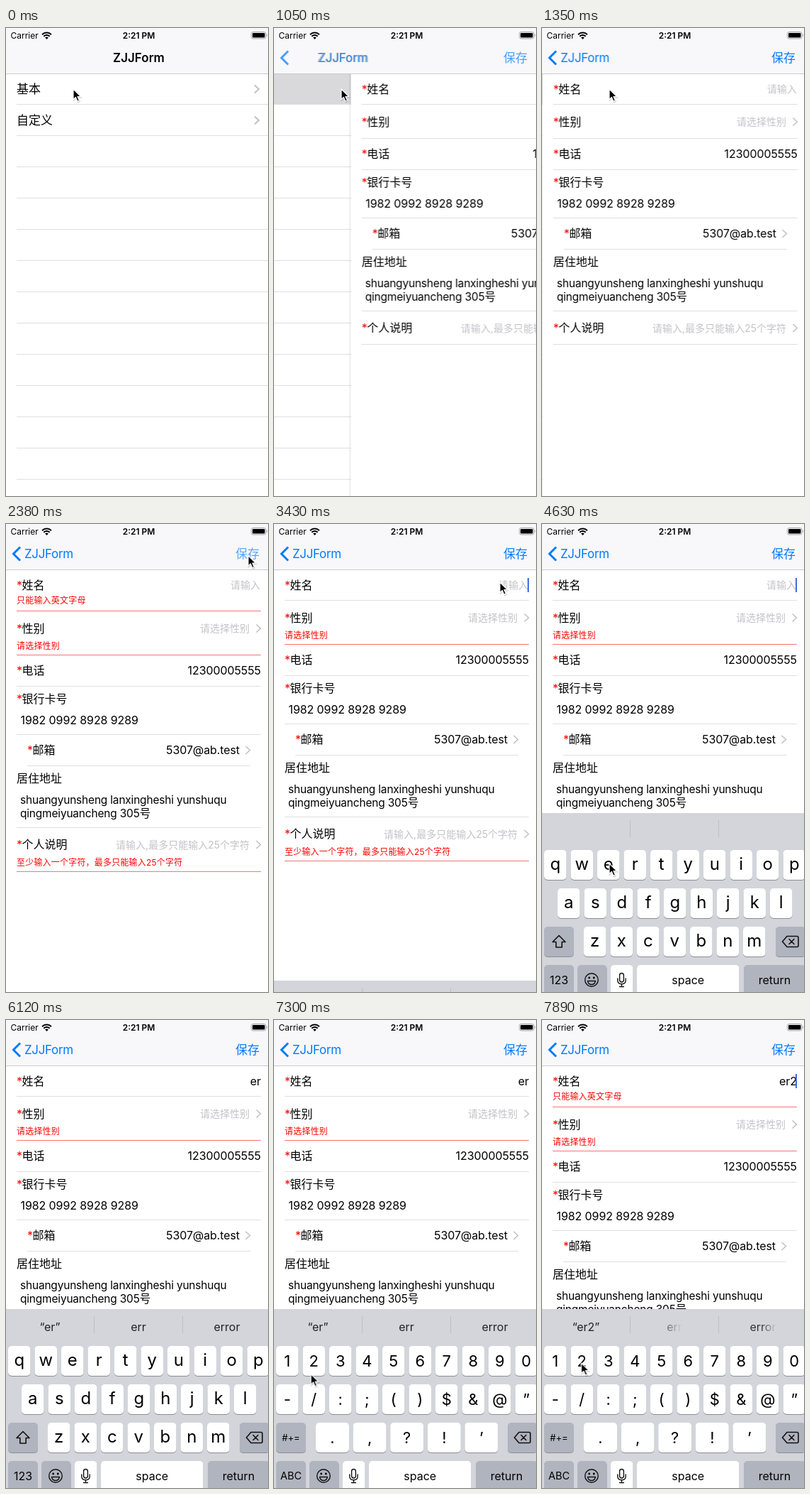
Animation, 370 px wide and 659 px high, one loop 8 s. Source, as an HTML page:

```html
<!DOCTYPE html>
<html lang="zh">
<head>
<meta charset="utf-8">
<title>ZJJForm</title>
<style>
  html, body { margin: 0; width: 100%; height: 100%; overflow: hidden; background: #fff; }
  svg { display: block; width: 370px; height: 659px; }
  text { font-family: Inter, "Noto Sans CJK SC", "Noto Sans CJK", sans-serif; white-space: pre; }
  [data-a] { animation: 8s linear infinite; }
  .step { animation-timing-function: step-end; }
  .red { fill: #f00; }
  .hint { fill: #c3c3c8; }
  .blue { fill: #007aff; }
  .err { fill: #f00; letter-spacing: .2px; }
  .value { letter-spacing: -.1px; }
  .prose { letter-spacing: -.2px; }
  .icon { fill: none; stroke: #111; stroke-width: 1.6; stroke-linecap: round; stroke-linejoin: round; }
</style>
</head>
<body>
<svg id="stage" viewBox="0 0 370 659"></svg>
<script>
const LOOP = 8000;
const SPRING = 'cubic-bezier(.36,.75,.1,1)';
const MID = 187.5;
const ALERT = '#fb7474';

// ---- drawing helpers: text is placed by its vertical centre ----
const text = (x, y, s, size = 16, attrs = '') =>
  `<text x="${x}" y="${y + size * .36}" font-size="${size}" ${attrs}>${s}</text>`;
const END = 'text-anchor="end"', CENTER = 'text-anchor="middle"';
const rect = (x, y, w, h, fill, attrs = '') =>
  `<rect x="${x}" y="${y}" width="${w}" height="${h}" fill="${fill}" ${attrs}/>`;
const line = (y, x = 15, end = 360, fill = '#dfdfe2') => rect(x, y, end - x, 1, fill);
const path = (d, attrs) => `<path d="${d}" ${attrs}/>`;
const chevron = (x, y, w = 1.5) =>
  path(`M${x} ${y - 5.5}l6 5.5-6 5.5`, `fill="none" stroke="#c1c1c5" stroke-width="${w}"`);
const anim = (name, body, step) => `<g data-a="${name}" class="${step ? 'step' : ''}">${body}</g>`;
const toggled = (name, body) => anim(name, body, true);
const label = (y, s, x = 15) => text(x, y, '*', 16, 'class="red"') + text(x + 7.5, y, s);
const error = (y, s, lineY) => text(15, y, s, 12, 'class="err"') + line(lineY, 15, 360, ALERT);

// ---- timing helpers, all times in ms ----
let css = '';
function keyframes(name, stops) {
  const body = stops.map(([ms, rule]) => `${ms / LOOP * 100}%{${rule}}`).join('');
  css += `@keyframes ${name}{${body}}[data-a="${name}"]{animation-name:${name}}`;
}
function toggle(name, first, ...flips) {
  const stops = [0, ...flips].map((ms, i) => [ms, `opacity:${(first + i) % 2}`]);
  keyframes(name, [...stops, [LOOP, stops.at(-1)[1]]]);
}
const at = (x, y = 0) => `transform:translate(${x}px,${y}px);`;
const ease = f => `animation-timing-function:${f};`;
function glide(name, start, from, to) {
  keyframes(name, [[0, from], [start, from + ease(SPRING)], [start + 500, to], [LOOP, to]]);
}

const PUSH = 920, SAVE = 2230, FOCUS = 3430, TYPE_E = 4930, TYPE_R = 5670, DIGITS = 6850, TYPE_2 = 7740;

glide('pageIn', PUSH, at(375), at(0));
glide('pageOut', PUSH, at(0), at(-112));
glide('titleOut', PUSH, at(0) + 'opacity:1;', at(-127) + 'opacity:0;');
glide('backIn', PUSH, at(127) + 'opacity:0;', at(0) + 'opacity:1;');
glide('fadeIn', PUSH, 'opacity:0;', 'opacity:1;');
glide('keyboard', FOCUS - 20, at(0, 260), at(0));
keyframes('saveTap', [[0, 'opacity:1'], [2070, 'opacity:1'], [2080, 'opacity:.3'],
  [SAVE, 'opacity:.3'], [2530, 'opacity:1'], [LOOP, 'opacity:1']]);

toggle('highlight', 0, 900);
toggle('nameOk', 1, SAVE, FOCUS, TYPE_2);
toggle('nameBad', 0, SAVE, FOCUS, TYPE_2);
toggle('restOk', 1, SAVE);
toggle('restBad', 0, SAVE);
keyframes('nameShift', [[0, at(0)], [SAVE, at(0, 15)], [FOCUS, at(0)], [TYPE_2, at(0, 15)], [LOOP, at(0, 15)]]);
keyframes('restShift', [[0, at(0)], [SAVE, at(0, 14)], [LOOP, at(0, 14)]]);

toggle('typed0', 1, TYPE_E);
toggle('typed1', 0, TYPE_E, TYPE_R);
toggle('typed2', 0, TYPE_R, TYPE_2);
toggle('typed3', 0, TYPE_2);
toggle('caret', 0, FOCUS, 4030, 4480, 6070, 6560, 7060, 7550);
toggle('letters', 1, DIGITS);
toggle('digits', 0, DIGITS);
toggle('popE', 0, 4780, TYPE_E);
toggle('popR', 0, 5520, TYPE_R);
toggle('pop2', 0, 7590, TYPE_2);

keyframes('pointer', [
  [0, 95, 86], [1400, 95, 86], [2060, 342, 44.5], [2400, 342, 44.5], [3100, 319, 82], [3850, 319, 82],
  [4580, 95, 478], [5050, 95, 478], [5400, 131, 480], [5750, 131, 480, 'ease-in'], [6110, 112, 690],
  [6400, 40, 690, 'ease-out'], [6650, 22, 640], [6950, 22, 640], [7400, 55.5, 483], [LOOP, 55.5, 483]
].map(([ms, x, y, f = 'ease-in-out']) => [ms, at(x, y) + ease(f)]));

// ---- list page ----
const list = rect(0, 64, 375, 600, '#fff')
  + toggled('highlight', rect(0, 64, 375, 44, '#d9d9dc'))
  + ['基本', '自定义'].map((s, i) => text(15, 86 + 44 * i, s, 17) + chevron(351, 86 + 44 * i, 2)).join('')
  + Array.from({ length: 13 }, (_, i) => line(107 + 44 * i, 15, 375)).join('');

// ---- form page ----
const nameRow = label(86, '姓名')
  + toggled('typed0', text(359, 86, '请输入', 14, `class="hint" ${END}`))
  + ['e', 'er', 'er2'].map((s, i) => toggled(`typed${i + 1}`, text(360, 86, s, 16, END))).join('')
  + toggled('caret', rect(358, 76, 2, 20, '#4169e1'))
  + toggled('nameOk', line(107))
  + toggled('nameBad', error(107.7, '只能输入英文字母', 122));

const genderRow = label(132, '性别')
  + text(344, 132, '请选择性别', 14, `class="hint" ${END}`) + chevron(353.5, 132)
  + toggled('restOk', line(155))
  + toggled('restBad', error(156.5, '请选择性别', 169));

const restRows = label(177.5, '电话') + text(360, 177.5, '12300005555', 16, `class="value" ${END}`) + line(199)
  + label(217, '银行卡号') + text(20.5, 247, '1982 0992 8928 9289', 16, 'class="value"') + line(267)
  + label(289.5, '邮箱', 30) + text(330, 289, '5307@ab.test', 16, `class="value" ${END}`)
  + chevron(338.5, 289.5) + line(311, 30, 345)
  + text(15, 329, '居住地址')
  + text(20, 359, 'shuangyunsheng lanxingheshi yunshuqu', 15.5, 'class="prose"')
  + text(20, 378, 'qingmeiyuancheng 305号', 15.5, 'class="prose"') + line(398)
  + label(422.5, '个人说明')
  + text(344, 422.5, '请输入,最多只能输入25个字符', 14, `class="hint" ${END}`) + chevron(353.5, 422.5)
  + toggled('restOk', line(445))
  + toggled('restBad', error(447.5, '至少输入一个字符，最多只能输入25个字符', 460));

const form = rect(-3, 64, 3, 600, '#000', 'opacity=".05"') + rect(0, 64, 375, 600, '#fff') + nameRow
  + toggled('nameShift', genderRow + toggled('restShift', restRows));

// ---- status and navigation bars ----
const bars = rect(0, 0, 375, 64, '#f8f7f9') + rect(0, 64, 375, 1, '#cbcacd')
  + text(6.5, 10.5, 'Carrier', 12)
  + path('M51 9.2a9.3 9.3 0 0 1 13 0M53.3 11.7a6 6 0 0 1 8.4 0', 'fill="none" stroke="#000" stroke-width="2"')
  + path('M57.5 16l-2.3-2.5a3.4 3.4 0 0 1 4.6 0z', '')
  + text(MID, 10.5, '2:21 PM', 12, `font-weight="600" ${CENTER}`)
  + rect(346.5, 5.5, 20.5, 9.5, 'none', 'rx="2.6" stroke="#a2a2a5"')
  + rect(348, 7, 17.5, 6.5, '#000', 'rx="1.3"')
  + path('M368.3 8.5q2 1.7 0 3.5z', 'fill="#a2a2a5"')
  + anim('titleOut', text(MID, 42, 'ZJJForm', 17, `font-weight="600" ${CENTER}`))
  + anim('backIn', text(26, 42, 'ZJJForm', 17, 'class="blue" letter-spacing="-.35"'))
  + anim('fadeIn', path('M20 32.5L10.5 42l9.5 9.5', 'fill="none" stroke="#007aff" stroke-width="3"')
    + anim('saveTap', text(324, 42, '保存', 17, 'class="blue" font-weight="500"')));

// ---- keyboard ----
const STEP = 37.5, KEY_W = 31.5, DARK = '#b0b4be';
const rowY = i => 459 + 54 * i;
const key = (x, row, w = KEY_W, fill = '#fff') =>
  rect(x, rowY(row) + 1, w, 42, '#8b8d93', 'rx="5"') + rect(x, rowY(row), w, 42, fill, 'rx="5"');
const glyph = (x, row, s, dy, size, w = KEY_W) => text(x + w / 2, rowY(row) + dy, s, size, CENTER);
const letter = (x, row, s) => key(x, row) + glyph(x, row, s, 19.4, 24);
const symbol = (x, row, s, w = KEY_W) => key(x, row, w) + glyph(x, row, s, 21.5, 22, w);
const keys = (chars, x, row, draw) => [...chars].map((c, i) => draw(x + STEP * i, row, c.replace('&', '&amp;'))).join('');
const wide = (x, row, s, w, fill = DARK, size = 16) => key(x, row, w, fill) + glyph(x, row, s, 21, size, w);

function popup(x, s, size) {
  const y = rowY(0), r = x + KEY_W;
  return path(`M${x - 1} ${y - 58}H${r + 1}q10 0 10 10V${y - 14}q0 7-6 11t-5 11V${y + 37}q0 5-5 5H${x + 5}q-5 0-5-5V${y + 8}q1-7-5-11t-6-11V${y - 48}q0-10 10-10z`,
    'fill="#fff" stroke="#a9abb1" stroke-width=".6"')
    + text(x + KEY_W / 2, y - 32, s, size, `font-weight="300" ${CENTER}`);
}

const suggest = (slot, s, fill = '#222') => text(62 + 125 * slot, 432, s, 16, `fill="${fill}" ${CENTER}`);
const suggestions = toggled('typed1', suggest(0, '“e”'))
  + toggled('typed2', suggest(0, '“er”') + suggest(1, 'err') + suggest(2, 'error'))
  + toggled('typed3', suggest(0, '“er2”') + suggest(1, 'err', 'url(#fadeA)') + suggest(2, 'error', 'url(#fadeB)'));

const backspace = key(330, 2, 42, DARK)
  + path('M346 580.5h14q2 0 2 2v11q0 2-2 2h-14l-6.5-7.5zM349 584.5l7 7m0-7l-7 7', 'class="icon"');
const emoji = key(50, 3, 41.5, DARK)
  + '<circle cx="70" cy="642" r="9.3" class="icon" style="stroke-width:1.4"/><circle cx="66.7" cy="639" r="1.4"/><circle cx="73.3" cy="639" r="1.4"/>'
  + path('M64.5 643.5h11q-1 5-5.5 5t-5.5-5z', 'class="icon" style="stroke-width:1.3"');
const mic = key(97, 3)
  + rect(109.6, 632.5, 5.8, 12.5, 'none', 'rx="2.9" class="icon" style="stroke-width:1.4"')
  + path('M106.8 640v2.5q0 5.2 5.7 5.2t5.7-5.2V640M112.5 648v3.5m-3 0h6', 'class="icon" style="stroke-width:1.4"');

const letterKeys = keys('qwertyuiop', 3, 0, letter) + keys('asdfghjkl', 22, 1, letter)
  + keys('zxcvbnm', 59, 2, letter) + key(3, 2, 42, DARK)
  + path('M24 579.5l9 9h-4.8v7.5h-8.4v-7.5H15z', 'class="icon"') + wide(3, 3, '123', 42);
const digitKeys = rect(0, 455, 375, 110, '#d3d5db')
  + keys('1234567890', 3, 0, symbol) + keys('-/:;()$&@”', 3, 1, symbol)
  + [...'.,?!’'].map((c, i) => symbol(59 + 52.6 * i, 2, c, 47)).join('')
  + wide(3, 2, '#+=', 42, DARK, 13) + wide(3, 3, 'ABC', 42, DARK, 14.5);

const keyboard = rect(0, 407, 375, 260, '#d3d5db')
  + rect(124, 417, 1, 24, '#bcbec4') + rect(249, 417, 1, 24, '#bcbec4') + suggestions
  + toggled('letters', letterKeys) + toggled('digits', digitKeys)
  + backspace + emoji + mic + wide(134, 3, 'space', 144.5, '#fff') + wide(285, 3, 'return', 87)
  + toggled('popE', popup(3 + STEP * 2, 'e', 36)) + toggled('popR', popup(3 + STEP * 3, 'r', 36))
  + toggled('pop2', popup(3 + STEP, '2', 34));

// arrow with a white rim and a soft shadow below
const ARROW = 'M0 0V14.6L3.4 11.5 5.9 17.2 8.4 16.1 6 10.6H10.6Z';
const pointer = path(ARROW, 'transform="translate(.6 1.2)" opacity=".18" stroke="#000" stroke-width="1.5"')
  + path(ARROW, 'stroke="#fff" stroke-width="1.2" stroke-linejoin="round"');

const fade = (id, from, alpha) => `<linearGradient id="${id}"><stop offset="${from}" stop-color="#222" stop-opacity="${alpha}"/>`
  + '<stop offset="1" stop-color="#222" stop-opacity="0"/></linearGradient>';

document.head.appendChild(document.createElement('style')).textContent = css;
document.getElementById('stage').innerHTML =
  `<defs>${fade('fadeA', .1, .55)}${fade('fadeB', .45, .9)}</defs>`
  + anim('pageOut', list) + anim('pageIn', form) + bars
  + anim('keyboard', keyboard) + anim('pointer', pointer);
</script>
</body>
</html>
```
